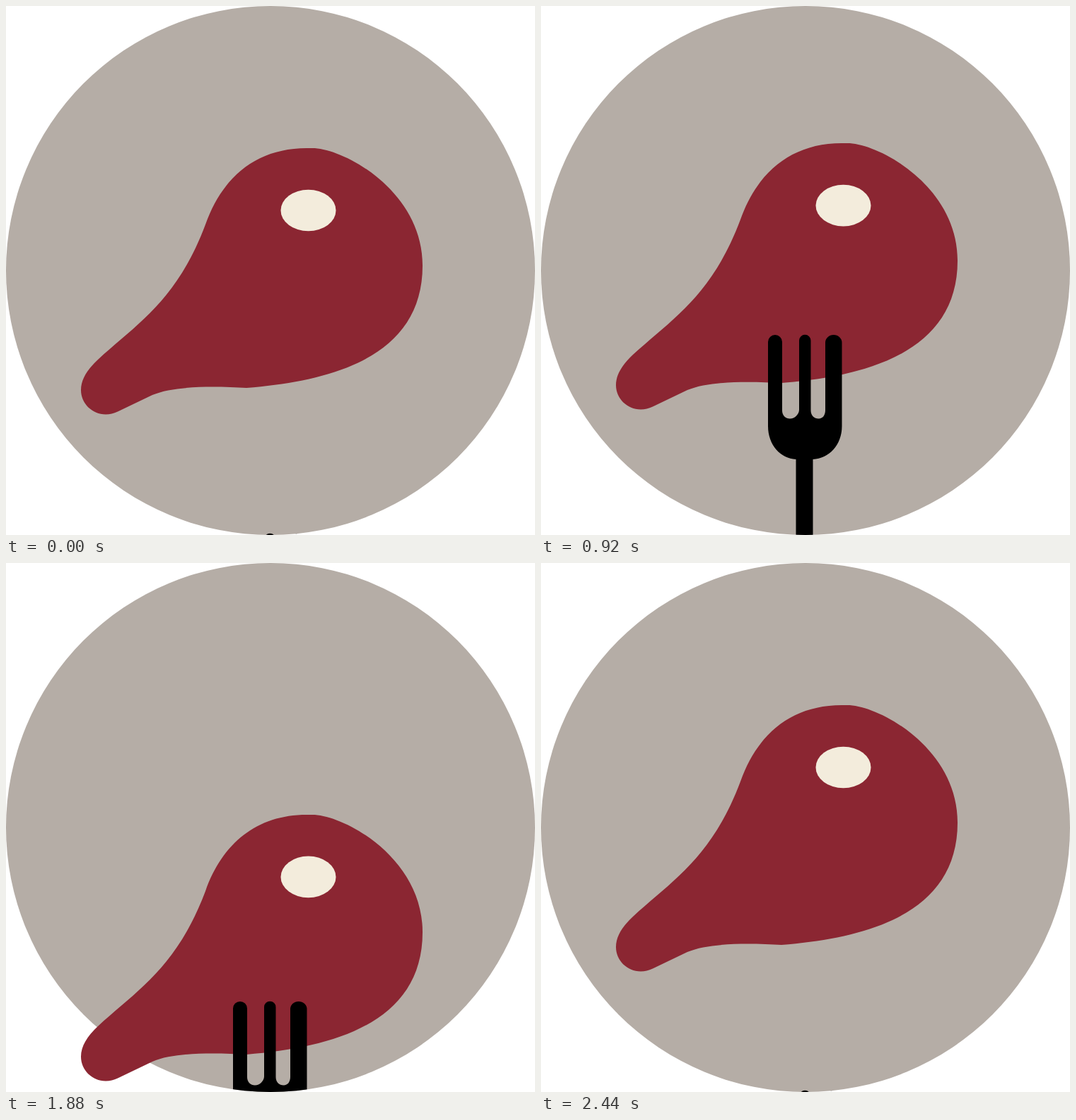
Write an HTML page that moves like this. It is 748 px wide and 748 px high and loops after 3000 ms.

```html
<!DOCTYPE html>
<html lang="en">
<head>
<meta charset="utf-8">
<title>Meat and fork</title>
<style>
  html, body { margin: 0; width: 100%; height: 100%; overflow: hidden; background: #fff; }
  svg { display: block; width: 100%; height: 100%; }
</style>
</head>
<body>
<svg viewBox="0 0 748 748">
  <clipPath id="plateClip"><circle cx="374" cy="374" r="374"/></clipPath>
  <circle cx="374" cy="374" r="374" fill="#b5ada6"/>
  <g id="meat">
    <path fill="#8b2632" d="M433 201C478 201 589 262 589 367C589 493 467 530 340 540
      C300 538 240 536 207 550L158 573.5C152 576 147 577.5 141 577.5
      C122 577.5 106 562 106 543C106 528 115 514 130 500
      C184 450 241 418 282 309C306 241 355 201 425 201Z"/>
    <ellipse cx="427.5" cy="289" rx="39" ry="29.3" fill="#f3ecdc"/>
  </g>
  <g clip-path="url(#plateClip)">
    <path id="fork" d="M321 475a10 10 0 0 1 20 0V572C341 579 346 583.5 352 583.5
      C359 583.5 365 577 365 571V473a8.25 8.25 0 0 1 16.5 0V572
      c0 7 5 11.5 11 11.5s9.5 -5 9.5 -12V476a11.75 11 0 0 1 23.5 0V594
      C425.5 621 407 640 384.5 641V800H360.5V641C339 640 321 621 321 594Z"/>
  </g>
</svg>
<script>
  const LOOP = 3000, STEP = 40;
  const HIDDEN = 281, HOP = -34.4, DROP = 177;
  const meat = document.getElementById('meat');
  const fork = document.getElementById('fork');

  // Linear interpolation through [time, value] keys, held at both ends.
  function track(keys, t) {
    const i = keys.findIndex(key => key[0] > t);
    if (i === 0) return keys[0][1];
    if (i < 0) return keys[keys.length - 1][1];
    const [t0, v0] = keys[i - 1], [t1, v1] = keys[i];
    return v0 + (v1 - v0) * (t - t0) / (t1 - t0);
  }

  const hop = [[560, 0], [760, HOP], [960, 0]];
  const reach = [[240, HIDDEN], [560, 0], [2160, 0], [2440, HIDDEN]];
  const dip = [[1160, 0], [1600, DROP], [1840, DROP], [2160, 0]];

  const moveY = (el, y) => el.setAttribute('transform', `translate(0 ${y})`);

  function draw() {
    const t = Math.floor(performance.now() % LOOP / STEP) * STEP;
    const shared = track(dip, t);
    moveY(meat, track(hop, t) + shared);
    moveY(fork, track(reach, t) + shared);
    requestAnimationFrame(draw);
  }
  draw();
</script>
</body>
</html>
```
